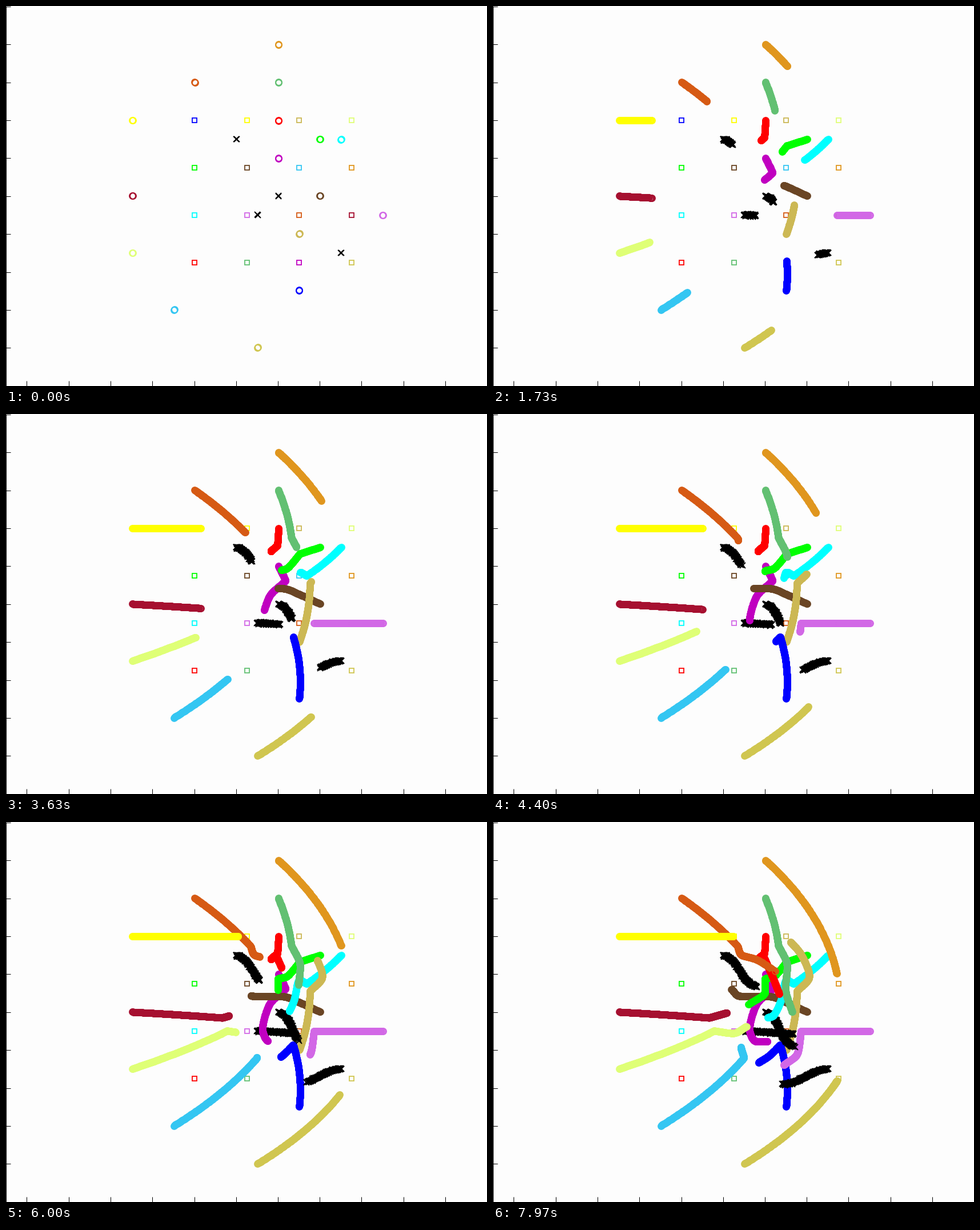
A matplotlib script that plays this animation: 842x665 px, repeating every 8000 ms.

```python
import numpy as np
import matplotlib.pyplot as plt
from matplotlib.animation import FuncAnimation

W, H, DPI = 842, 665, 64
PX = 72 / DPI               # points per pixel
FRAMES, CHUNK = 240, 40
STEPS = np.arange(FRAMES + 1)
SPEED, SLOW, CURL = 0.0151, 0.43, 0.11
rng = np.random.default_rng(4)

fig = plt.figure(figsize=(W / DPI, H / DPI), dpi=DPI, facecolor="#fdfdfd")
ax = fig.add_axes([0, 0, 1, 1])
ax.set_xlim(0, W)
ax.set_ylim(H, 0)
ax.axis("off")


def to_px(p):
    """World units to stage pixels."""
    return np.asarray(p, float) * (73.2, -66.4) + (476.7, 332.4)


def steer(start, goal):
    """Constant speed towards the goal, bent to the right, slowing near it."""
    pos = [np.array(start, float)]
    for _ in STEPS[1:]:
        d = goal - pos[-1]
        dist = np.hypot(*d) + 1e-9
        way = d / dist + (CURL * dist, 0)
        pos.append(pos[-1] + SPEED * np.tanh(dist / SLOW) * way / np.hypot(*way))
    return np.array(pos)


def smooth(t, p, s):
    """Monotone cubic through points p at times t."""
    h = np.diff(t)[:, None]
    d = np.diff(p, axis=0) / h
    a, b = d[:-1], d[1:]
    same = a * b > 0
    inner = np.where(same, 2 * a * b / np.where(same, a + b, 1), 0)
    m = np.concatenate([d[:1], inner, d[-1:]])
    i = np.clip(np.searchsorted(t, s, "right") - 1, 0, len(h) - 1)
    u = ((s - t[i]) / h[i, 0])[:, None]
    return (p[i] * (1 + 2 * u) * (1 - u) ** 2 + p[i + 1] * u * u * (3 - 2 * u)
            + h[i] * (m[i] * u * (1 - u) ** 2 + m[i + 1] * u * u * (u - 1)))


trails = []


def add_trail(xy, color, **style):
    parts = []
    for c in range(0, FRAMES + 1, CHUNK):
        line, = ax.plot([], [], ls="none", mec=color, mfc="none",
                        zorder=3 + c, snap=False, **style)
        parts.append((c, line))
    trails.append((xy.T, parts))


def agent(color, start, turn=FRAMES, *bends):
    """Steers freely until step `turn`, then dodges through evenly timed bends."""
    row, col = divmod(len(trails), 4)
    goal = np.array([-2 + 1.25 * col, 2 - 1.25 * row])
    ax.plot(*to_px(goal), "s", mec=color, mfc="none", ms=8 * PX,
            mew=1.8 * PX, zorder=2)
    pos = steer(start, goal)
    if bends:
        t = np.linspace(turn, FRAMES, len(bends) + 1)
        pos[turn:] = smooth(t, np.array([pos[turn], *bends]), STEPS[turn:])
    add_trail(to_px(pos), color, marker="o", ms=10.8 * PX, mew=2 * PX)


def obstacle(x, y, heading, swing):
    """Slow drift whose heading swings out and back, with a little noise."""
    a = np.radians(heading + swing * np.sin(np.pi * STEPS / FRAMES))
    move = 0.0049 * np.column_stack([np.cos(a), np.sin(a)])
    pos = (x, y) + np.cumsum(move, axis=0) - move[0]
    noise = rng.normal(0, 0.9, pos.shape)
    noise[:2] *= 0.4
    add_trail(to_px(pos) + noise, "black", marker="x",
              ms=9.5 * PX, mew=1.8 * PX)


# axis lines and ticks
ax.vlines(0, 0, H, color="k", lw=PX)
ax.hlines(H, 0, W, color="k", lw=PX)
ax.hlines(np.round(np.arange(10) * 66.37) + 1, 0, 8, color="k", lw=PX)
ax.vlines(np.round(36.5 + np.arange(11) * 73.25), H - 9, H, color="k", lw=PX)

# agents in the order of their goal squares, row by row
agent("#0000ff", (0.5, -2.5), 109, (0.08, -1.16), (-0.16, -1.33))
agent("#ffff00", (-3.5, 2))
agent("#ccb854", (0.5, -1), 104, (1.05, 0.95), (0.85, 1.52), (0.6, 1.85))
agent("#dfff76", (-3.5, -1.5), 165, (-0.78, -0.56), (-0.45, -0.38))

agent("#00ff00", (1, 1.5), 34, (0.19, 0.93), (-0.01, 0.86),
      (-0.01, 0.53), (-0.4, 0.2))
agent("#6a4524", (1, 0), 30, (0.08, 0.41), (-0.61, 0.42), (-0.81, 0.6))
agent("#34c6f2", (-2.5, -3), 178, (-0.59, -0.93))
agent("#e0961e", (0, 4))

agent("#00ffff", (1.5, 1.5), 74, (0.5, 0.84), (0.37, 0.3),
      (0.18, -0.1), (0.06, -0.15))
agent("#d268e6", (2.5, -0.5), 109, (0.77, -1.08), (0.44, -1.4))
agent("#d65a14", (-2, 3), 122, (-0.59, 1.52), (-0.23, 1.39), (0.23, 1.08))
agent("#a61030", (-3.5, 0), 143, (-0.92, -0.02))

agent("#ff0000", (0, 2), 30, (-0.18, 1.39), (-0.08, 1.48),
      (0.1, 1.11), (0.33, 0.48))
agent("#62c072", (0, 3), 85, (0.52, 1.2), (0.48, 0.63), (0.64, 0))
agent("#c000c0", (0, 1), 28, (-0.23, 0.17), (-0.38, -0.44),
      (-0.23, -0.77), (0.05, -0.78))
agent("#d0c650", (-0.5, -4))

obstacle(-1, 1.5, -20, -42)
obstacle(0, 0, -22, -48)
obstacle(-0.5, -0.5, -4, 0)
obstacle(1.5, -1.5, 183, 28)


def update(k):
    artists = []
    for (x, y), parts in trails:
        for start, line in parts:
            end = min(k + 2, start + CHUNK)
            line.set_visible(end > start)
            if end > start:
                line.set_data(x[start:end], y[start:end])
            artists.append(line)
    return artists


anim = FuncAnimation(fig, update, frames=FRAMES, interval=8000 / FRAMES,
                     init_func=lambda: update(0), repeat=True, repeat_delay=0)
plt.show()
```
